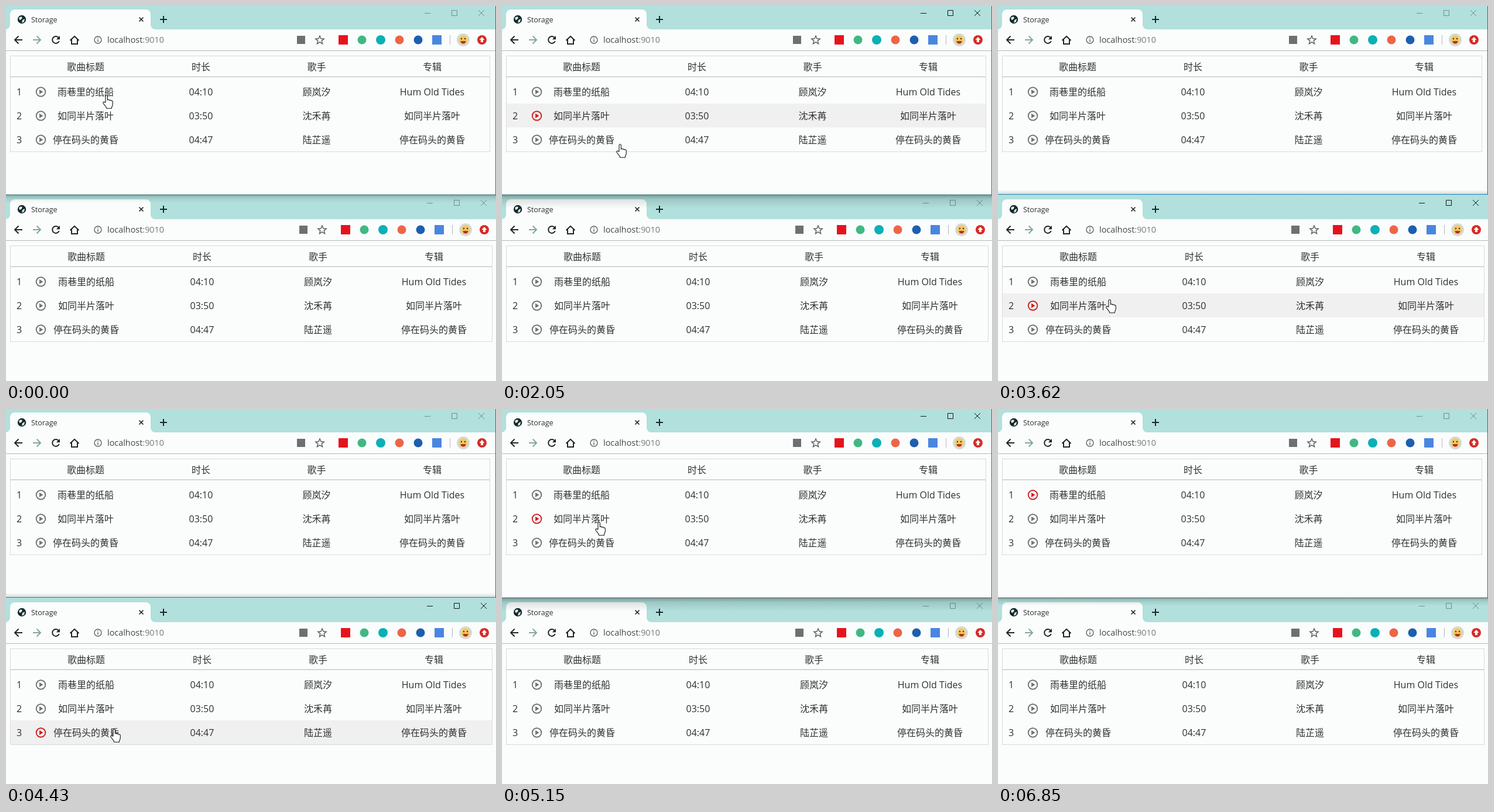
Recreate the animation shown at these times as an HTML page. Size 837 by 642 pixels, loop 6.95 s.

```html
<!DOCTYPE html>
<html lang="zh-CN">
<head>
<meta charset="utf-8">
<title>Storage</title>
<style>
  html, body { margin: 0; width: 100%; height: 100%; overflow: hidden; background: #fbfdfd; }
  svg { display: block; }
  text { font: 16px "Open Sans", "Noto Sans CJK SC", "Noto Sans CJK", sans-serif; fill: #2d3031; }
  .mid { text-anchor: middle; }
  .line { fill: none; stroke: #1d2626; stroke-width: 2; }
  .control { fill: none; stroke: #6d8f8c; stroke-width: 1; }
  .active .control { stroke: #0d1515; }
  .play { --ink: #717474; }
  .play.on { --ink: #d0211f; }
  .play circle { fill: none; stroke: var(--ink); stroke-width: 1.9; }
  .play path { fill: var(--ink); }
  .cursor { fill: #fff; stroke: #111; stroke-width: 1.1; stroke-linejoin: round; }
</style>
</head>
<body>
<svg id="stage" width="837" height="642" viewBox="0 0 837 642"></svg>
<script>
const LOOP = 6950;
const SONGS = [
  ['雨巷里的纸船', '04:10', '顾岚汐', 'Hum Old Tides'],
  ['如同半片落叶', '03:50', '沈禾苒', '如同半片落叶'],
  ['停在码头的黄昏', '04:47', '陆芷遥', '停在码头的黄昏'],
];
const HEADINGS = ['歌曲标题', '时长', '歌手', '专辑'];

// Each entry changes some of the state and holds until the next one.
const STATES = [
  [0, { active: -1, playing: [-1, -1], lit: [-1, -1], omnibox: false }],
  [710, { active: 0 }],
  [960, { playing: [0, -1], lit: [0, -1] }],
  [1900, { playing: [1, -1], lit: [1, -1] }],
  [2320, { omnibox: true }],
  [2710, { active: 1, lit: [-1, -1] }],
  [2860, { playing: [-1, 0], lit: [-1, 0], omnibox: false }],
  [3620, { playing: [-1, 1], lit: [-1, 1] }],
  [4430, { playing: [-1, 2], lit: [-1, 2] }],
  [5150, { active: 0, playing: [1, -1], lit: [-1, -1] }],
  [5850, { playing: [0, -1], lit: [0, -1] }],
  [6850, { active: -1, lit: [-1, -1] }],
];

// time, x, y, shape
const POINTER = [
  [0, 165, 152, 'hand'], [1360, 168, 157, 'hand'], [1500, 172, 168, 'hand'],
  [1630, 177, 181, 'hand'], [1900, 184, 200, 'hand'], [2050, 195, 236, 'hand'],
  [2170, 202, 376, 'beam'], [2320, 199, 412, 'arrow'], [2440, 192, 442, 'hand'],
  [2560, 184, 460, 'hand'], [2980, 184, 466, 'hand'], [3100, 184, 476, 'hand'],
  [3220, 184, 490, 'hand'], [3340, 184, 502, 'hand'], [3750, 182, 546, 'hand'],
  [3900, 182, 565, 'hand'], [4150, 178, 564, 'hand'], [4430, 178, 547, 'hand'],
  [4580, 178, 343, 'arrow'], [4730, 176, 236, 'hand'], [4850, 159, 196, 'hand'],
  [5000, 159, 193, 'hand'], [5300, 167, 181, 'hand'], [5420, 173, 167, 'hand'],
  [5570, 183, 156, 'hand'], [6000, 705, 446, 'hand'], [6150, 767, 565, 'arrow'],
  [6270, 818, 628, 'arrow'], [6430, 0, 0, 'none'],
];

const SHAPES = {
  hand: 'M5 13V2.4a1.7 1.7 0 0 1 3.4 0V9c.5-1.2 3-1 3.2.6 .6-1 2.8-.8 3 .8 .8-.8 2.7-.3 2.7 1.5V16c0 3-2 4-2 7.3H6.8C6.5 20 3 18 .9 14.2c-.8-1.6 1.2-2.8 2.4-1.6z',
  arrow: 'M.5.5V16.5l3.7-3.6 2.6 5.6 2.3-1-2.5-5.5h5z',
  beam: 'M1 .5h2.5l1 1 1-1H8M4.5 1.5v16M1 18.5h2.5l1-1 1 1H8',
  none: '',
};

const path = (d, attrs = 'class="line"') => `<path d="${d}" ${attrs}/>`;
const disc = (x, y, r, fill) => `<circle cx="${x}" cy="${y}" r="${r}" fill="${fill}"/>`;
const rect = (x, y, w, h, attrs) => `<rect x="${x}" y="${y}" width="${w}" height="${h}" ${attrs}/>`;
const label = (x, y, text, attrs = 'class="mid"') => `<text x="${x}" y="${y}" ${attrs}>${text}</text>`;

function tabStrip() {
  return rect(0, -3, 837, 43, 'fill="#b2e0dc"')
    + path('M-1 40a8 8 0 0 0 8-8V14a8 8 0 0 1 8-8H239a8 8 0 0 1 8 8v18a8 8 0 0 0 8 8z', 'fill="#fbfdfd"')
    + disc(27, 23, 7.2, '#14292a')
    + path('M22 20l4-2 2 2-2 3-3 1zM28 24l4-2-1 5-4 2z', 'fill="#dcebea"')
    + label(43, 28, 'Storage', 'style="font-size:12.5px"')
    + path('M227.5 19.5l7 7m0-7l-7 7', 'class="line" style="stroke-width:1.7"')
    + path('M263 23h12M269 17v12');
}

function toolbar() {
  return path('M28 58H15M21.5 51.5L15 58l6.5 6.5')
    + path('M46 58h13M52.5 51.5L59 58l-6.5 6.5', 'class="line" style="stroke:#83a5a3"')
    + path('M90 54.3A6 6 0 1 0 90.8 60')
    + path('M92 51v6.2h-6.2z', 'fill="#1d2626"')
    + path('M109.5 59L117 51.8l7.5 7.2M112 57.5V65h10V57.5')
    + path('M151 58a6 6 0 1 0 12 0a6 6 0 1 0-12 0M157 57v4.5M157 54v1.6', 'class="line" style="stroke:#5c6263;stroke-width:1.4"')
    + label(173, 63, 'localhost<tspan fill="#747a7b">:9010</tspan>', 'style="font-size:14.4px;fill:#414647"');
}

function extensions() {
  return rect(497, 51, 14, 14, 'fill="#6b7072"')
    + path('M536 51l2 4.8 5.2.4-4 3.4 1.3 5.1-4.5-2.8-4.5 2.8 1.3-5.1-4-3.4 5.2-.4z', 'class="line" style="stroke:#555b5c;stroke-width:1.4"')
    + rect(568, 50, 16, 16, 'fill="#e5141c"')
    + disc(608, 58, 7.5, '#41b883')
    + disc(640, 58, 8, '#0bb0b5')
    + disc(672, 58, 7.5, '#ee6545')
    + disc(704, 58, 7.5, '#1b5fae')
    + rect(728, 50, 16, 16, 'fill="#4a86e0"')
    + path('M758.5 50v16', 'stroke="#aeb8b8"')
    + disc(781, 58, 11, '#d5d9d8') + disc(781, 58, 7.5, '#f4c95a')
    + disc(778, 56, 1.2, '#40301c') + disc(784, 56, 1.2, '#40301c')
    + path('M776.5 60h9a4.5 4.5 0 0 1-9 0z', 'fill="#b3312b"')
    + disc(813, 58, 8, '#d62c25')
    + path('M813 53l4.5 5H815v4h-4v-4h-2.5z', 'fill="#fff"');
}

function songTable(width, columns) {
  const cells = (values, y) => values.map((v, i) => label(columns[i], y, v)).join('');
  const rows = SONGS.map((song, i) => {
    const y = 147 + 41 * i;
    return rect(8, y - 21, width - 1, 41, 'class="row"')
      + label(22.5, y + 6, i + 1)
      + `<g class="play" transform="translate(59.5 ${y})"><circle r="7.8"/>${path('M-2.5-4L4 0l-6.5 4z', '')}</g>`
      + cells(song, y + 6);
  }).join('');
  return rows + cells(HEADINGS, 110)
    + path(`M8 121.2h${width}`, 'stroke="#c6cbca" stroke-width="1.4"')
    + rect(7.5, 85.5, width, 164, 'fill="none" stroke="#d6dad9"');
}

function browser(y, shift, columns) {
  const controls = path('M715 12.5h10M761.5 7.5h9v9h-9zM807 7l10 10m0-10l-10 10', 'class="control"');
  return `<g class="browser" transform="translate(0 ${y})">
    ${rect(0, 40, 837, 283, 'fill="#fbfdfd"')}
    ${tabStrip()}
    ${rect(139, 44, 419, 28, 'class="omnibox" rx="14" fill="#eff1f3"')}
    ${toolbar()}
    <g transform="translate(${shift} 0)">${extensions()}${controls}</g>
    ${path('M0 76.5h837', 'stroke="#b3b8b8"')}
    ${songTable(819 + shift, columns)}</g>`;
}

const gradient = (id, from, to, stops) => `<linearGradient id="${id}" x1="0" x2="0" y1="${from}" y2="${to}" gradientUnits="userSpaceOnUse">`
  + stops.map(([at, alpha]) => `<stop offset="${at}" stop-color="#1b2c2c" stop-opacity="${alpha}"/>`).join('') + '</linearGradient>';

const stage = document.getElementById('stage');
stage.innerHTML = '<defs>'
  + gradient('below', 324, 346, [[0, .36], [.3, .14], [1, 0]])
  + gradient('soft', 324, 337, [[0, .26], [.4, .1], [1, 0]])
  + gradient('above', 315, 322, [[0, 0], [1, .16]]) + '</defs>'
  + browser(0, 0, [136, 333, 530.5, 728])
  + browser(325, 4, [137, 335, 533, 731])
  + rect(836, 0, 1, 323, 'fill="#1c6f8f"')
  + rect(0, 0, 837, 22, 'id="shadow"') + rect(0, 0, 837, 1, 'id="edge"')
  + '<path id="cursor" class="cursor"/>';

const windows = [...stage.querySelectorAll('.browser')];
const [shadow, edge, cursor] = ['shadow', 'edge', 'cursor'].map(id => document.getElementById(id));

function draw(t) {
  const state = Object.assign({}, ...STATES.filter(([at]) => at <= t).map(([, change]) => change));
  windows.forEach((win, w) => {
    win.classList.toggle('active', state.active === w);
    win.querySelector('.omnibox').style.display = w === 1 && state.omnibox ? '' : 'none';
    win.querySelectorAll('.row').forEach((row, i) => row.setAttribute('fill', state.lit[w] === i ? '#f0f0f0' : 'none'));
    win.querySelectorAll('.play').forEach((icon, i) => icon.classList.toggle('on', state.playing[w] === i));
  });

  const lowerOnTop = state.active === 1;
  edge.setAttribute('y', lowerOnTop ? 322 : 323);
  edge.setAttribute('fill', lowerOnTop ? '#1c83b4' : '#5b6b6b');
  shadow.setAttribute('y', lowerOnTop ? 315 : 324);
  shadow.setAttribute('height', lowerOnTop ? 7 : 22);
  shadow.setAttribute('fill', `url(#${lowerOnTop ? 'above' : state.active === 0 ? 'below' : 'soft'})`);

  const [, x, y, shape] = POINTER.findLast(([at]) => at <= t);
  cursor.setAttribute('d', SHAPES[shape]);
  cursor.setAttribute('transform', `translate(${x} ${y})`);
}

const start = performance.now();
function tick() {
  draw((performance.now() - start) % LOOP);
  requestAnimationFrame(tick);
}
tick();
</script>
</body>
</html>
```
